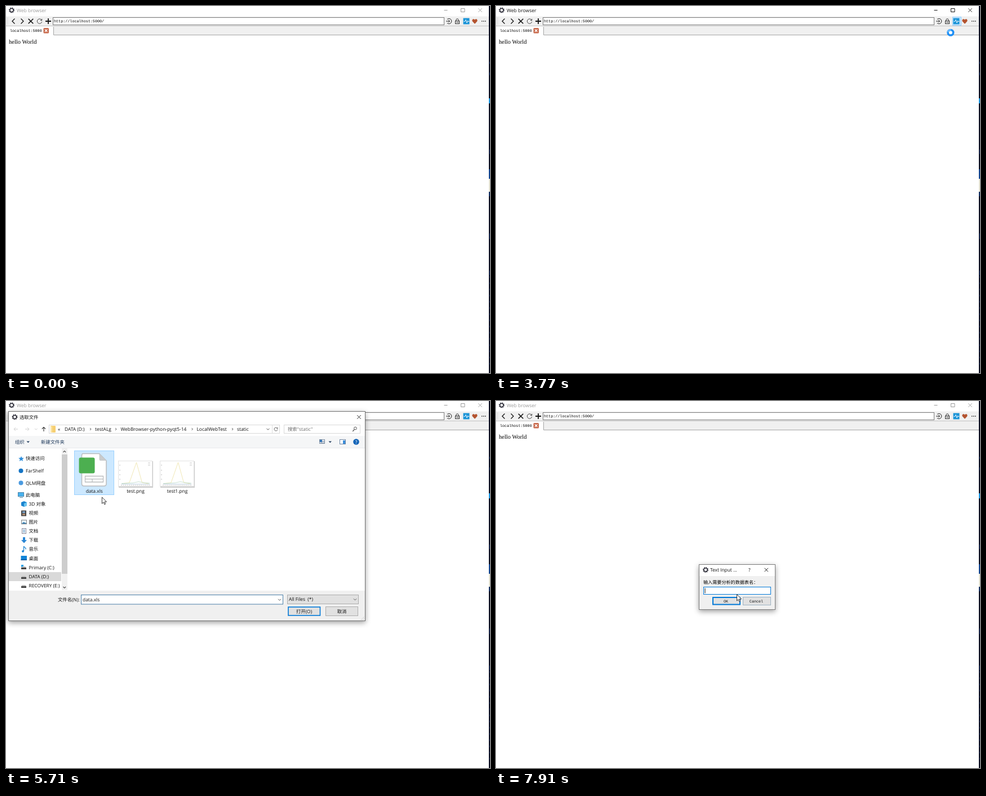
Recreate the animation shown at these times as an HTML page. Size 859 by 652 pixels, loop 7990 ms.

```html
<!DOCTYPE html>
<html lang="zh-CN">
<head>
<meta charset="utf-8">
<title>Web browser</title>
<style>
html, body { margin: 0; width: 100%; height: 100%; overflow: hidden; background: #fff; }
svg { display: block; width: 859px; height: 652px; }
text { font: 8.4px 'Open Sans', 'Noto Sans CJK SC', 'Noto Sans CJK', sans-serif; white-space: pre; text-rendering: geometricPrecision; }
.mono { font: 6.75px 'Liberation Mono', monospace; }
.song { font-size: 8.1px; }
.serif { font: 10.5px 'Liberation Serif', serif; }
</style>
</head>
<body>
<svg id="stage" viewBox="0 0 859 652" xmlns="http://www.w3.org/2000/svg"></svg>
<script>
const LOOP = 7990;

const rect = (x, y, w, h, fill, more = '') =>
  `<rect x="${x}" y="${y}" width="${w}" height="${h}" fill="${fill}" ${more}/>`;
const box = (x, y, w, h, fill, stroke, more = '') =>
  rect(x + .5, y + .5, w - 1, h - 1, fill, `stroke="${stroke}" ${more}`);
const line = (d, color = '#111', width = 1, more = '') =>
  `<path d="${d}" fill="none" stroke="${color}" stroke-width="${width}" ${more}/>`;
const shape = (d, fill) => `<path d="${d}" fill="${fill}"/>`;
const disc = (x, y, r, fill, more = '') => `<circle cx="${x}" cy="${y}" r="${r}" fill="${fill}" ${more}/>`;
const text = (x, y, s, fill = '#111', more = '') => `<text x="${x}" y="${y}" fill="${fill}" ${more}>${s}</text>`;
const mid = (x, y, s, more = '') => text(x, y, s, '#111', `text-anchor="middle" ${more}`);
const group = (id, body, more = '') => `<g id="${id}" ${more}>${body}</g>`;
const cross = (x, y, r, color, w = 1) =>
  line(`M${x - r} ${y - r}l${2 * r} ${2 * r}m0 ${-2 * r}l${-2 * r} ${2 * r}`, color, w);
const down = (x, y, color = '#555') => line(`M${x - 2.5} ${y - 1.2}l2.5 2.5 2.5-2.5`, color, 1);
const gear = (x, y) => disc(x, y, 3.1, 'none', 'stroke="#1c1c28" stroke-width="1.3"') +
  disc(x, y, 4.3, 'none', 'stroke="#1c1c28" stroke-width="1.4" stroke-dasharray="1.6 1.777"');
const reload = (x, y, r, color) =>
  line(`M${x + r * .9} ${y - r * .45}A${r} ${r} 0 1 0 ${x + r} ${y + r * .2}M${x + r} ${y - r}v${r * .65}h${-r * .65}`, color, .9);
const shadowed = (x, y, w, h) => rect(x, y, w, h, '#fff', 'filter="url(#shadow)"');

function browser() {
  const strip = rect(857, 0, 2, 652, '#070a1d') +
    [[99, 4], [118, 5], [255, 8], [404, 10], [470, 8]].map(([y, h]) => rect(858, y, 1, h, '#163069')).join('') +
    rect(857, 164, 2, 9, '#1593e0') + rect(857, 290, 2, 17, '#0c3f8c') +
    rect(857, 307, 2, 23, '#e6e4d4') + rect(857, 330, 2, 8, '#0e2b5e') +
    line('M858.5 480V640', '#12224e', 1, 'stroke-dasharray="3 8"');
  const caption = gear(10, 7.5) +
    group('caption', text(19, 10.8, 'Web browser', 'currentColor', 'style="font-size:8.55px"') +
      line('M777.5 7.5h6', 'currentColor') + line('M807.5 4.5h6.5v6h-6.5z', 'currentColor') +
      cross(841.5, 7.5, 3.2, 'currentColor', .9));
  const tools = rect(0, 18, 857, 33, '#f0f0f0') + line('M0 18.5H857', '#f7f7f7') +
    line('M3 21V34', '#bbb', 1, 'stroke-dasharray="1 1.6"') +
    line('M15.5 22.5L11 27l4.5 4.5M26.500 22.500L31 27l-4.500 4.500', '#111', 1.3) +
    cross(44, 27, 4.3, '#111', 1.6) + reload(59.5, 27, 4.2, '#333') +
    line('M70 27h10M75 22v10', '#111', 1.8) +
    box(83, 20, 695, 14, '#fff', '#7a7a7a') +
    text(85, 29.3, 'http://localhost:5000/', '#000', 'class="mono"');
  const actions = line('M783 23.700A4.600 4.600 0 1 1 783 30.300M781 27h6.500M785.300 24.800l2.300 2.200-2.300 2.200', '#222', 1) +
    box(797, 26, 8, 6, 'none', '#333') + line('M798.800 26.500v-1.500a2.200 2.200 0 0 1 4.400 0v1.500M799 29h4.500', '#333', 1) +
    group('hover', box(810, 19, 16, 16, '#cce8ff', '#99d1ff')) +
    rect(811.5, 21.5, 11, 11, '#1c95d8') +
    line('M812.500 27.500h2l1.500-3 2 5.500 1.500-4 .8 1.500h1.700', '#fff', .9) +
    shape('M832 31.700L828 27.500C826 24.500 829.800 21.500 832 24.600C834.200 21.500 838 24.500 836 27.500Z', '#b4532f') +
    line('M844 27h8', '#222', 1.5, 'stroke-dasharray="1.500 1.500"');
  const tab = line('M0 35.500H857', '#c4c4c4') + rect(0, 36, 84, 16, '#fff') +
    line('M84.500 37V51.500H857', '#a5a5a5') +
    text(7, 46.2, 'localhost:5000', '#000', 'class="mono"') +
    rect(66.5, 39, 9.5, 9.5, '#c8694c', 'rx="1.500"') + cross(71.2, 43.7, 2.2, '#fff', 1.4);
  return rect(0, 0, 859, 652, '#fff') + caption + tools + actions + tab +
    text(5, 66.5, 'hello World', '#000', 'class="serif"') + strip;
}

const drive = (y) => shape(`M27 ${y + 1}l1.500-2h6l1.500 2z`, '#bbb') + rect(27, y + 1, 9, 3, '#444');

function sidebar() {
  const items = [
    [35, 102, '快速访问'], [35, 124, 'FarShelf'], [35, 145.5, 'QLM网盘'], [35, 167, '此电脑'],
    [40.5, 183, '3D 对象'], [40.5, 199, '视频'], [40.5, 215, '图片'], [40.5, 231, '文档'],
    [40.5, 247, '下载'], [40.5, 263.3, '音乐'], [40.5, 279.5, '桌面'],
    [40.5, 295.5, 'Primary (C:)'], [40.5, 311.7, 'DATA (D:)'], [40.5, 327.7, 'RECOVERY (E:)']
  ];
  const star = 'M27 98l1.400 3 3.400.3-2.600 2.200.9 3.500-3.100-1.900-3.100 1.900.9-3.500-2.600-2.200 3.400-.3z';
  const icons = shape(star, '#2f8fdc') + disc(26.5, 124, 4, '#1474c4') + disc(26.5, 145.5, 4, '#4a9ae0') +
    box(21, 162, 11, 8, '#49b2ee', '#4b84a8') + rect(24, 171, 6, 1, '#4b84a8') +
    shape('M27 180l5-2 5 2v6l-5 2-5-2z', '#1b84cf') + shape('M32 182l5-2v6l-5 2z', '#6cc5ef') +
    rect(27, 194.5, 9, 10, '#444') + rect(29, 196, 5, 3, '#7da3c7') + rect(29, 200, 5, 3, '#ad8b70') +
    box(27, 211, 10, 8, '#e8f2f8', '#888') + shape('M28 218l3-3 5 2v1z', '#3e83b5') +
    box(28, 226, 8, 10, '#fff', '#889') + line('M30 229h4m-4 2h4m-4 2h4', '#5b92c0') +
    shape('M30 242h4v5h3l-5 5.500-5-5.500h3z', '#2a86d4') +
    line('M31.500 267v-9q1 2 3.500 3.500v2', '#1b84d3', 1.3) + disc(30, 267, 1.9, '#1b84d3') +
    rect(26.5, 275, 10.5, 8, '#0f83d8') + rect(26.5, 281.5, 10.5, 1.5, '#0a569a') +
    rect(27, 291, 4, 4, '#21a1e6') + drive(295) + drive(312) + drive(328);
  return rect(5, 304, 93, 16, '#d9d9d9') + icons + items.map(([x, y, s]) => text(x, y + 3, s)).join('') +
    rect(99, 84, 10, 252, '#f0f0f0') + rect(99, 95, 10, 212, '#cdcdcd') +
    line('M101.500 91l2.300-2.300 2.300 2.300M101.500 330l2.300 2.300 2.300-2.300', '#444', 1.1);
}

const thumb = (x, name) => rect(x + 1, 107, 61, 47, '#ccc') + box(x, 106, 61, 46, '#fff', '#e2e2e2') +
  line(`M${x + 2} 114h3m-3 9h3m-3 8h3m-3 8h3M${x + 5} 149.500h52`, '#aaa', .8, 'stroke-dasharray="2 1.500"') +
  line(`M${x + 6} 147l14-2 12.500-36 10 36 12 2`, '#f1e8b6', 1) +
  line(`M${x + 6} 146.500l20-1 10-2 10 1.500 10 1`, '#b9d8c8', .8) + line(`M${x + 6} 147.500h50`, '#b6cfe2', .8) +
  line(`M${x + 53} 109.500h4m-4 2.500h4m-4 2.500h4`, '#ccc', .8) + mid(x + 31, 162.6, name);

function fileDialog() {
  const crumbs = [[92, '«'], [104, 'DATA (D:)'], [158, 'testALg'], [203.5, 'WebBrowser-python-pyqt5-14'],
    [338.5, 'LocalWebTest'], [410, 'static']];
  const header = group('dialogIcon', gear(15.5, 28.5) + cross(626.5, 28.5, 3.2, '#222')) +
    group('dialogTitle', text(24, 31.5, '选取文件')) +
    line('M21 50h-7m3-3l-3 3 3 3M34 50h7m-3-3l3 3-3 3M51 49l2.300 2 2.300-2', '#cfcfcf', 1) +
    line('M67 54v-7.500m-3.200 3.200l3.200-3.200 3.200 3.200', '#333', 1.1) +
    box(76, 42, 410, 16, '#fff', '#d9d9d9') + line('M472.500 43V57', '#ddd') +
    rect(79, 44, 9, 12, '#f6cf72', 'rx="1"') + rect(79, 45, 3, 11, '#fbe3a4') +
    crumbs.map(([x, s]) => text(x, 52.6, s)).join('') +
    [150, 195, 330.5, 402].map(x => line(`M${x - 1} 48l2 2-2 2`, '#444', .9)).join('') +
    down(465, 50) + reload(479, 50, 3, '#555') +
    box(493, 42, 136, 16, '#fff', '#d9d9d9') + text(500, 52.8, '搜索"static"', '#6d6d6d') +
    disc(620, 48.5, 2.4, 'none', 'stroke="#555"') + line('M618.300 50.500l-3 3.500', '#555', 1.2);
  const bar = rect(5, 62, 632, 22, '#f5f6f7') + line('M5 83.500H637', '#e9eaec') +
    group('commands', text(16, 75.7, '组织', '#1e395b') + shape('M36.500 71.500h5.500l-2.700 2.800z', '#1e395b') +
      text(62, 75.7, '新建文件夹', '#1e395b') + box(556, 68, 10, 8, '#fff', '#7d8da0') +
      rect(557, 69, 4, 4, '#3778ba') + line('M561 71.500h4m-7 2.500h7', '#6d8098') +
      shape('M572.500 71.500h5.500l-2.700 2.800z', '#1e395b')) +
    box(592, 68, 11, 9, '#fff', '#6e87a5') + rect(598, 70, 4, 6, '#3c8edb') +
    disc(621.5, 72.5, 5.3, '#1565b8') + text(621.5, 75.6, '?', '#fff', 'text-anchor="middle" font-weight="700"');
  const sheet = 'M136.500 93.500h29l12.500 12.500v41q0 4-4 4h-35.500q-4 0-4-4v-49.500q0-4 2-4z';
  const files = group('cell', '<rect x="121.5" y="88.5" width="70" height="78"/>') +
    `<path d="${sheet}" fill="#fff" stroke="#b9bbbd" stroke-width="1.500"/>` +
    shape('M165.500 93.500v10q0 2.500 2.500 2.500h10z', '#c9cbcd') +
    line('M140.500 133.500h32v10.500h-32zM140.500 138.700h32M153 138.700v5', '#bbbdbf', 1.3) +
    rect(129.5, 100.5, 28, 28, '#4caf50', 'rx="3"') +
    mid(156.7, 162.6, 'data.xls') + thumb(199, 'test.png') + thumb(273, 'test1.png');
  const footer = rect(5, 337, 632, 53, '#f0f0f0') + text(92, 355.6, '文件名(N):') +
    group('field', rect(133.5, 344.5, 358, 16.5, '#fff')) +
    group('fieldCaret', line('M137 347v11', '#000', .9)) +
    group('fieldMark', rect(135, 347, 31.5, 12, '#0078d7')) +
    group('fieldText', text(136, 355.9, 'data.xls', 'currentColor')) + down(485.5, 353) +
    box(499, 344, 127, 17, '#e1e1e1', '#adadad') + text(502, 355.4, 'All Files  (*)') + down(619.5, 352.5) +
    group('open', '<rect x="501" y="366" width="56.5" height="15"/>') + mid(529, 376.5, '打开(O)') +
    box(567, 365, 58, 17, '#e1e1e1', '#adadad') + mid(596, 376.5, '取消') +
    line('M630 389l6-6m-3 6l3-3', '#bbb', 1, 'stroke-dasharray="1 1"');
  return shadowed(4, 18, 634, 373) + rect(4, 18, 634, 373, '#fff') + header + bar + sidebar() + files + footer +
    box(4, 18, 634, 373, 'none', '#6f6f6f');
}

const inputDialog = () => shadowed(360, 290, 136, 81) + rect(360, 290, 136, 81, '#f0f0f0') +
  rect(361, 291, 134, 20, '#fff') + gear(372, 300) + text(380, 303.4, 'Text Input ...') + mid(449.7, 303.4, '?') +
  cross(479.7, 300, 3.2, '#222') + text(368, 325, '输入需要分析的数据表名：', '#000', 'class="song"') +
  box(368, 330, 120, 14, '#fff', '#0078d7') + line('M371 332.500v9', '#000', .9) +
  rect(385, 349, 48, 12.5, '#e1e1e1', 'stroke="#0078d7" stroke-width="2"') + mid(408, 357.8, 'OK', 'class="mono"') +
  box(438, 348, 50, 15, '#e1e1e1', '#9fb4c4') + mid(462, 357.8, 'Cancel', 'class="mono"') +
  box(360, 290, 136, 81, 'none', '#7b7b7b');

const stage = document.getElementById('stage');
stage.innerHTML = `<defs><filter id="shadow" x="-20%" y="-20%" width="140%" height="150%">
  <feDropShadow dx="0" dy="3" stdDeviation="5" flood-color="#000" flood-opacity=".38"/></filter></defs>` +
  browser() + group('files', fileDialog()) + group('input', inputDialog()) +
  group('pointer', `<path d="M.5.500V12l2.700-2.500 1.700 4 1.800-.8-1.700-3.900h3.600z" fill="#fff" stroke="#222" stroke-width=".9"/>`) +
  group('busy', disc(0, 0, 4.8, '#fff', 'stroke="#1e8ff5" stroke-width="3.600"') +
    line('M0-4.800A4.800 4.800 0 0 1 4.800 0', '#63b8ff', 3, 'id="spin"'));

const el = {};
stage.querySelectorAll('[id]').forEach(node => el[node.id] = node);
const show = (id, on) => el[id].setAttribute('display', on ? 'inline' : 'none');
const paint = (id, fill, stroke, width = 1) => {
  const r = el[id].firstElementChild;
  r.setAttribute('fill', fill);
  r.setAttribute('stroke', stroke);
  r.setAttribute('stroke-width', width);
};
const ramp = (t, a, b) => Math.min(1, Math.max(0, (t - a) / (b - a)));

// Pointer stops: time, x, y
const route = [
  [130, 784, 626], [350, 735, 450], [580, 679, 308], [830, 683, 300], [1130, 788, 170], [1350, 776, 85],
  [1590, 690, 72], [1680, 650, 70], [2000, 427, 60], [2150, 460, 74], [2450, 774, 72], [2540, 787, 71],
  [2800, 817, 48], [3140, 816, 28], [3690, 816, 28], [3770, 807, 47], [4150, 738, 148], [4630, 738, 148],
  [5240, 210, 150], [5400, 157, 135], [5580, 157, 137], [5710, 169.5, 170], [5790, 200, 195],
  [6090, 491, 384], [6170, 497, 382], [6480, 521, 371], [7440, 521, 371], [7830, 427, 343]
];

function pointerAt(t) {
  const i = route.findIndex(stop => stop[0] > t);
  if (i < 0) return route[route.length - 1].slice(1);
  if (i === 0) return route[0].slice(1);
  const [t0, x0, y0] = route[i - 1], [t1, x1, y1] = route[i];
  const k = (t - t0) / (t1 - t0);
  return [x0 + (x1 - x0) * k, y0 + (y1 - y0) * k];
}

function popup(id, cx, cy, amount) {
  show(id, amount > 0);
  const s = .92 + .08 * (1 - (1 - amount) ** 3);
  el[id].setAttribute('opacity', amount);
  el[id].setAttribute('transform', `translate(${cx} ${cy}) scale(${s}) translate(${-cx} ${-cy})`);
}

function render(t) {
  const active = (t >= 3450 && t < 4150) || (t >= 7440 && t < 7670);
  el.caption.setAttribute('color', active ? '#111' : '#999');
  show('hover', t >= 2880 && t < 4150);

  popup('files', 321, 204, t < 7000 ? ramp(t, 4440, 4640) : 1 - ramp(t, 7340, 7520));
  popup('input', 428, 330, ramp(t, 7640, 7800));

  const closing = t >= 7280, picked = t >= 5480, pressed = t >= 7110;
  show('dialogIcon', !closing);
  el.dialogTitle.setAttribute('transform', `translate(${closing ? -14 : 0} 0)`);
  show('commands', t >= 4700);
  show('cell', t >= 5320);
  if (pressed) paint('cell', '#d9d9d9', '#d9d9d9');
  else if (picked) paint('cell', '#cce8ff', '#99d1ff');
  else paint('cell', '#e5f3ff', '#e5f3ff');
  paint('field', '#fff', picked ? '#4a7fa8' : '#0078d7');
  show('fieldCaret', !picked);
  show('fieldText', picked);
  el.fieldText.setAttribute('color', pressed ? '#fff' : '#111');
  show('fieldMark', pressed);
  if (pressed) paint('open', '#cce4f7', '#005499');
  else if (t >= 6240) paint('open', '#e5f1fb', '#0078d7', 1.6);
  else paint('open', '#e1e1e1', '#0078d7', 1.6);

  const waiting = t >= 3520 && t < 4100;
  const at = `translate(${pointerAt(t)})`;
  show('pointer', t >= 130 && !waiting);
  show('busy', waiting);
  el.pointer.setAttribute('transform', at);
  el.busy.setAttribute('transform', at);
  el.spin.setAttribute('transform', `rotate(${t * .36})`);
}

const start = performance.now();
function tick() {
  render((performance.now() - start) % LOOP);
  requestAnimationFrame(tick);
}
tick();
</script>
</body>
</html>
```
